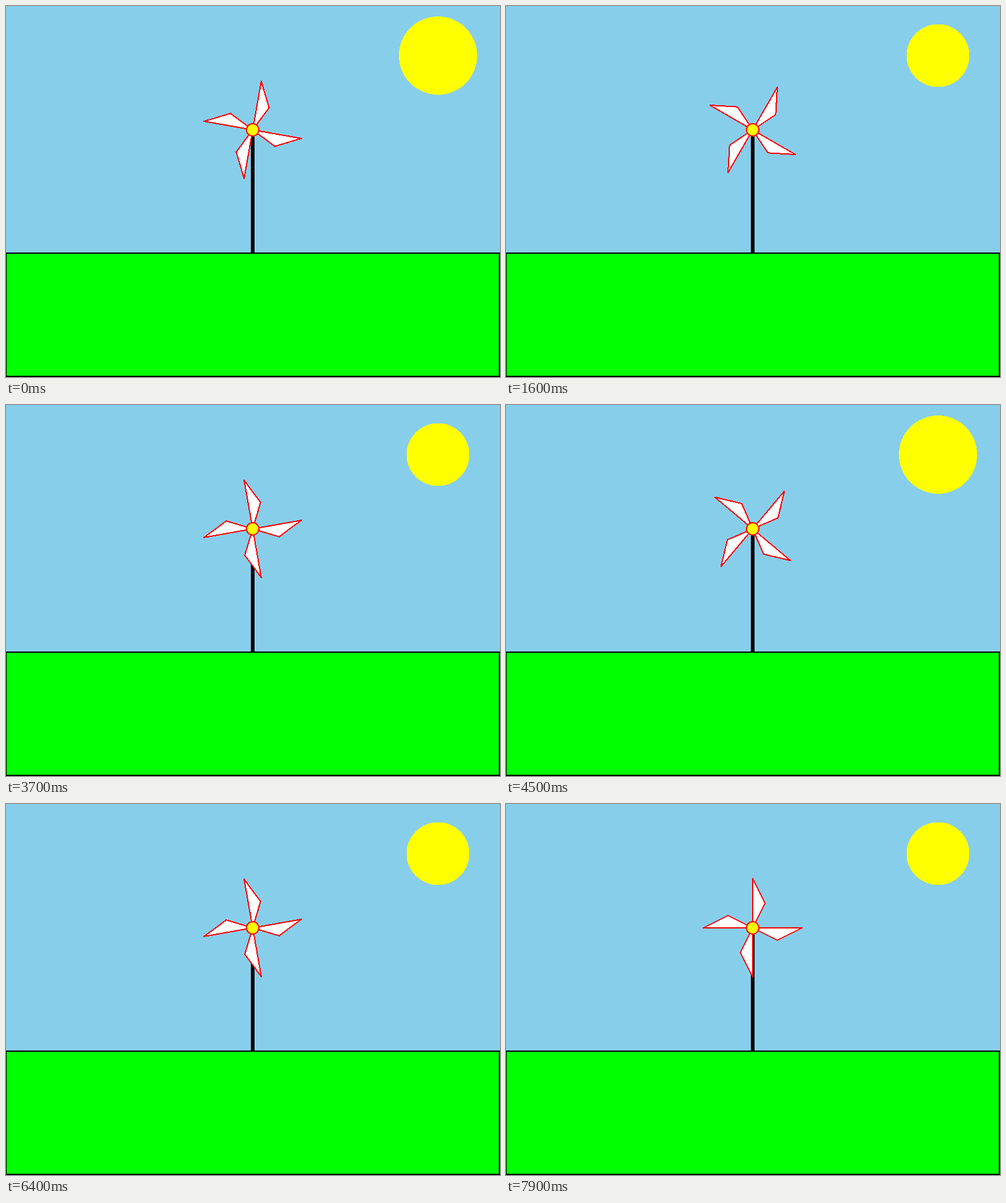
Recreate the animation shown at these times as an HTML page. Size 801 by 602 pixels, loop 8000 ms.

```html
<!DOCTYPE html>
<html lang="en">
<head>
<meta charset="utf-8">
<title>Pinwheel</title>
<style>
  html, body { margin: 0; width: 100%; height: 100%; overflow: hidden; background: #87ceeb; }
  svg { display: block; }
</style>
</head>
<body>
<svg width="801" height="602" viewBox="0 0 801 602" shape-rendering="crispEdges">
  <rect width="801" height="602" fill="#87ceeb"/>
  <circle id="sun" cx="700.5" cy="80.5" r="63.5" fill="#ff0"/>
  <rect x="0" y="401" width="800" height="200" fill="#0f0" stroke="#000" stroke-width="2"/>
  <rect x="397" y="201" width="6" height="200"/>
  <g id="wheel" fill="#fff" stroke="#f00" stroke-width="2" stroke-linejoin="round"></g>
  <circle cx="400" cy="201" r="10" fill="#ff0" stroke="#f00" stroke-width="2"/>
</svg>
<script>
const LOOP = 8000;
const sun = document.getElementById('sun');
const wheel = document.getElementById('wheel');

wheel.innerHTML = [0, 90, 180, 270]
  .map(a => `<path d="M0 0V-80L20 -40Z" transform="rotate(${a})"/>`)
  .join('');

// Steps last 100 ms and 200 ms in turn.
const stepAt = t => 2 * Math.floor(t / 300) + (t % 300 >= 100 ? 1 : 0);

function draw(t) {
  const step = stepAt(t % LOOP);
  wheel.setAttribute('transform', `translate(400 201) rotate(${10 + 10 * step})`);
  sun.setAttribute('r', step % 2 ? 51 : 63.5);
}

const start = performance.now();
function tick() {
  draw(performance.now() - start);
  requestAnimationFrame(tick);
}
tick();
</script>
</body>
</html>
```
